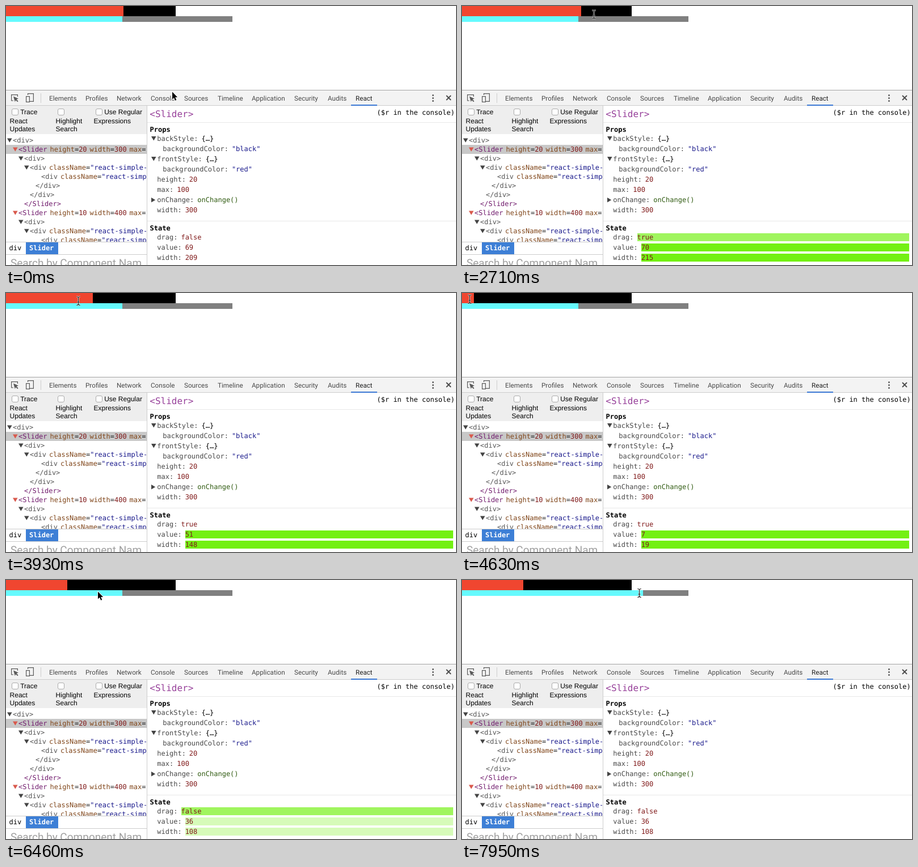
Recreate the animation shown at these times as an HTML page. Size 793 by 457 pixels, loop 8000 ms.

```html
<!DOCTYPE html>
<html lang="en">
<head>
<meta charset="utf-8">
<title>Slider inspector</title>
<style>
html, body { margin: 0; width: 100%; height: 100%; overflow: hidden; background: #fff; }
svg { display: block; width: 793px; height: 457px; }
text { text-rendering: geometricPrecision; white-space: pre; }
.mono { font: 12px "DejaVu Sans Mono", monospace; }
.bold { font-weight: bold; }
.head { font-size: 16px; }
.tab { font: 11.7px Roboto, sans-serif; }
.label { font: 12px "Liberation Sans", sans-serif; }
.search { font: 19px Roboto, sans-serif; }
</style>
</head>
<body>
<svg viewBox="0 0 793 457" xmlns="http://www.w3.org/2000/svg">
  <defs>
    <clipPath id="treeClip"><rect y="226" width="247.5" height="190"/></clipPath>
    <clipPath id="searchClip"><rect y="439" width="238" height="18"/></clipPath>
    <path id="beamShape" d="M-3.2 -7.5Q0 -7.5 0 -5V5Q0 7.5 -3.2 7.5M3.2 -7.5Q0 -7.5 0 -5V5Q0 7.5 3.2 7.5M-2 2H2"/>
  </defs>
  <rect width="793" height="457" fill="#fff"/>

  <rect width="299" height="18" fill="#000"/>
  <rect id="red" height="18" fill="#f04630"/>
  <rect y="18" width="399" height="10" fill="#808080"/>
  <rect id="cyan" y="18" height="10" fill="#66fafe"/>

  <rect y="148" width="793" height="28" fill="#f3f3f3"/>
  <path d="M0 148.5H793" stroke="#a3a3a3"/>
  <path d="M0 175.5H793" stroke="#ccc"/>
  <rect y="176" width="248" height="50" fill="#eee"/>
  <rect x="608" y="174" width="46" height="2" fill="#3b78d4"/>
  <g fill="none" stroke="#5a5a5a" stroke-width="1.2">
    <path d="M13 167H9.6V156.6H20.4V160"/>
    <path d="M38.5 157V154.6H48.4V168.4H42"/>
    <rect x="35.6" y="159.6" width="5.8" height="9.8"/>
  </g>
  <path d="M13 159.5L22 163.5L18.6 164.8L21.6 168L20.2 169.3L17.2 166.2L15.8 169.2Z" fill="#5a5a5a"/>
  <path d="M61.5 154V171" stroke="#ccc"/>
  <path d="M752.5 157.5v0m0 5v0m0 5v0" stroke="#5a5a5a" stroke-width="3" stroke-linecap="round"/>
  <path d="M776 158L784 166M784 158L776 166" stroke="#4a4a4a" stroke-width="1.8"/>

  <rect y="245" width="248" height="16" fill="#c8c8c8"/>
  <g id="tree" clip-path="url(#treeClip)"></g>
  <path d="M0 416.5H248M0 438.5H248" stroke="#ccc"/>
  <rect x="35" y="417" width="57" height="21" fill="#3d7fd6"/>
  <path d="M248.5 176V457" stroke="#ccc"/>
  <path d="M249 205.5H793M249 379.5H793" stroke="#e8e8e8"/>
  <g id="flashes" fill="#73f013">
    <rect x="309" y="401" width="479" height="14"/>
    <rect x="316" y="419" width="472" height="14"/>
    <rect x="316" y="437" width="472" height="14"/>
  </g>
  <g id="panel"></g>

  <path id="arrow" d="M.5 .5V13.4L3.5 10.7L5.6 15.8L7.8 14.9L5.7 9.9H9.6Z" fill="#000" stroke="#fff" stroke-width="1.6" stroke-linejoin="round" paint-order="stroke"/>
  <g id="beam" fill="none">
    <use href="#beamShape" stroke="#fff" stroke-width="2.6" stroke-opacity=".75"/>
    <use href="#beamShape" stroke="#222" stroke-width="1.2"/>
  </g>
</svg>
<script>
const $ = id => document.getElementById(id);
const CHAR = 7.2246;
const C = { tag: '#701a6c', plain: '#555', attr: '#80461a', str: '#1a1a8c', num: '#801a1a', key: '#484848', fn: '#2f5a10' };
const esc = s => s.replace(/&/g, '&amp;').replace(/</g, '&lt;');
const text = (x, y, s, fill = '#000', cls = 'mono', id = '') =>
  `<text x="${x}" y="${y}" fill="${fill}" class="${cls}"${id && ` id="${id}"`}>${esc(s)}</text>`;
const down = (x, y, fill = '#444') => `<path d="M${x} ${y}h8.6l-4.3 7.4z" fill="${fill}"/>`;
const right = (x, y) => `<path d="M${x} ${y}l7.2 4.2l-7.2 4.2z" fill="#444"/>`;

// Element tree; leading spaces give the depth, "+" an open arrow
const box = 'className="react-simple-slider"';
const slider = (h, w) => [
  `+<Slider height=${h} width=${w} max=100`,
  ' +<div>',
  `  +<div ${box}`,
  `    <div ${box}`,
  '   </div>',
  '  </div>',
  ' </Slider>'
];
const rows = ['+<div>', ...slider(20, 300).map(s => ' ' + s), ...slider(10, 400).map(s => ' ' + s)];

$('tree').innerHTML = rows.map((row, i) => {
  const depth = row.search(/[+<]/), open = row[depth] === '+', y = 241 + 16 * i;
  const [tag, ...attrs] = row.slice(depth + open).split(' ');
  const custom = tag.includes('Slider');
  let x = 12 + 10 * depth, out = '';
  const put = (s, fill) => { out += text(x, y, s, fill); x += s.length * CHAR; };
  if (open) out += down(x - 10, y - 7.6, custom ? '#d9594c' : '#444');
  put(tag, custom ? C.tag : C.plain);
  for (const attr of attrs) {
    const [name, value] = attr.split('=');
    x += 5;
    put(name, C.attr);
    put('=', '#222');
    put(value, value[0] === '"' ? C.str : C.num);
  }
  return out;
}).join('');

// Property lines, 18 px apart: key, small gap, value; a mark puts an arrow in front
const props = (y0, list) => list.map(([key, value, fill, mark, indent = 0], i) => {
  const x = 266.3 + indent, y = y0 + 18 * i;
  return (mark ? mark(256, y - 8) : '') + text(x, y, key + ':', C.key) +
    text(x + (key.length + 1) * CHAR + 6, y, value, fill, 'mono', y0 > 400 ? key : '');
}).join('');

const tabs = [['Elements', 76], ['Profiles', 140], ['Network', 195], ['Console', 255], ['Sources', 314],
  ['Timeline', 373], ['Application', 433], ['Security', 508], ['Audits', 567], ['React', 616]];
const options = [[7, 'Trace', 'React', 'Updates'], [88, '', 'Highlight', 'Search'], [155, 'Use Regular', 'Expressions']];

$('panel').innerHTML = [
  ...tabs.map(([s, x]) => text(x, 167, s, s === 'React' ? '#222' : '#4a4a4a', 'tab')),
  ...options.map(([x, first, ...rest]) =>
    `<rect x="${x + 3.5}" y="181.5" width="11" height="11" rx="2.5" fill="#fff" stroke="#aaa"/>` +
    text(x + 18.2, 191, first, '#000', 'label') +
    rest.map((s, i) => text(x - .4, 207 + 14 * i, s, '#000', 'label')).join('')),
  text(5.5, 431, 'div'),
  text(41, 431, 'Slider', '#fff', 'mono bold'),
  `<g clip-path="url(#searchClip)">${text(8, 460, 'Search by Component Name', '#a0a0a0', 'search')}</g>`,
  text(253.3, 196, '<Slider>', '#97409a', 'mono head'),
  text(653.5, 192, '($r in the console)'),
  text(253.5, 222, 'Props', '#000', 'mono bold'),
  props(238, [
    ['backStyle', '{…}', '#000', down],
    ['backgroundColor', '"black"', C.str, null, 10],
    ['frontStyle', '{…}', '#000', down],
    ['backgroundColor', '"red"', C.str, null, 10],
    ['height', '20', C.num],
    ['max', '100', C.num],
    ['onChange', 'onChange()', C.fn, right],
    ['width', '300', C.num]
  ]),
  text(253.5, 396, 'State', '#000', 'mono bold'),
  props(412, [['drag', '', C.num], ['value', '', C.num], ['width', '', C.num]])
].join('');

// The screen refreshes in steps; the pointer swings between a few turning points.
const LOOP = 8000, START = 253, STEP = 87.27, FADE = 850;
const PRESS = 26, STOP = 65, RELEASE = 69, PRESS2 = 82;
const turns = [
  [-1, 292, 151], [3, 246, 90], [4, 246, 90], [11, 207, 9], [13, 207, 9], [20, 281, 11], [24, 204, 12],
  [PRESS, 209, 13], [31, 276, 18], [51.5, 9, 11], [59.7, 309, 14], [STOP, 108, 14],
  [76, 200, 25], [81, 200, 25], [85.5, 324, 26], [90, 304, 21]
];

function pointer(k) {
  const i = Math.max(1, turns.findIndex(turn => turn[0] >= k));
  const [k0, x0, y0] = turns[i - 1], [k1, x1, y1] = turns[i];
  const f = Math.min(1, Math.max(0, (k - k0) / (k1 - k0)));
  const e = (1 - Math.cos(Math.PI * f)) / 2;
  return { x: x0 + (x1 - x0) * e, y: y0 + (y1 - y0) * e };
}

// The sliders trail the pointer by about one step
const reach = (k, lag) => k < PRESS ? 209 : Math.min(300, pointer(Math.min(k - lag, STOP)).x);
const width = k => Math.round(reach(k, 1));
const value = k => Math.floor(reach(k, 1.3) / 3);
const cyan = k => k <= PRESS2 ? 205 : Math.round(pointer(k - 1).x);
const drag = k => k >= PRESS && k < RELEASE;

// Strength of the green flash, from the time since the state last changed
function flash(state, k) {
  let age = 0;
  while (age < 11 && state(k - age) === state(k - age - 1)) age++;
  return Math.max(0, 1 - age * STEP / FADE) ** 1.7;
}

const flashes = $('flashes').children;
let last = null;
function draw(now) {
  const k = Math.floor((now % LOOP - START) / STEP);
  if (k !== last) {
    last = k;
    const beam = (k >= PRESS && k < 59) || k >= PRESS2;
    const { x, y } = pointer(k);
    $('arrow').style.display = beam ? 'none' : '';
    $('beam').style.display = beam ? '' : 'none';
    $(beam ? 'beam' : 'arrow').setAttribute('transform', `translate(${Math.round(x) + .5} ${Math.round(y)})`);

    $('red').setAttribute('width', Math.min(299, value(k) * 3));
    $('cyan').setAttribute('width', cyan(k));
    Object.entries({ drag, value, width }).forEach(([id, state], i) => {
      $(id).textContent = state(k);
      flashes[i].setAttribute('opacity', flash(state, k));
    });
  }
  requestAnimationFrame(draw);
}
draw(performance.now());
</script>
</body>
</html>
```
